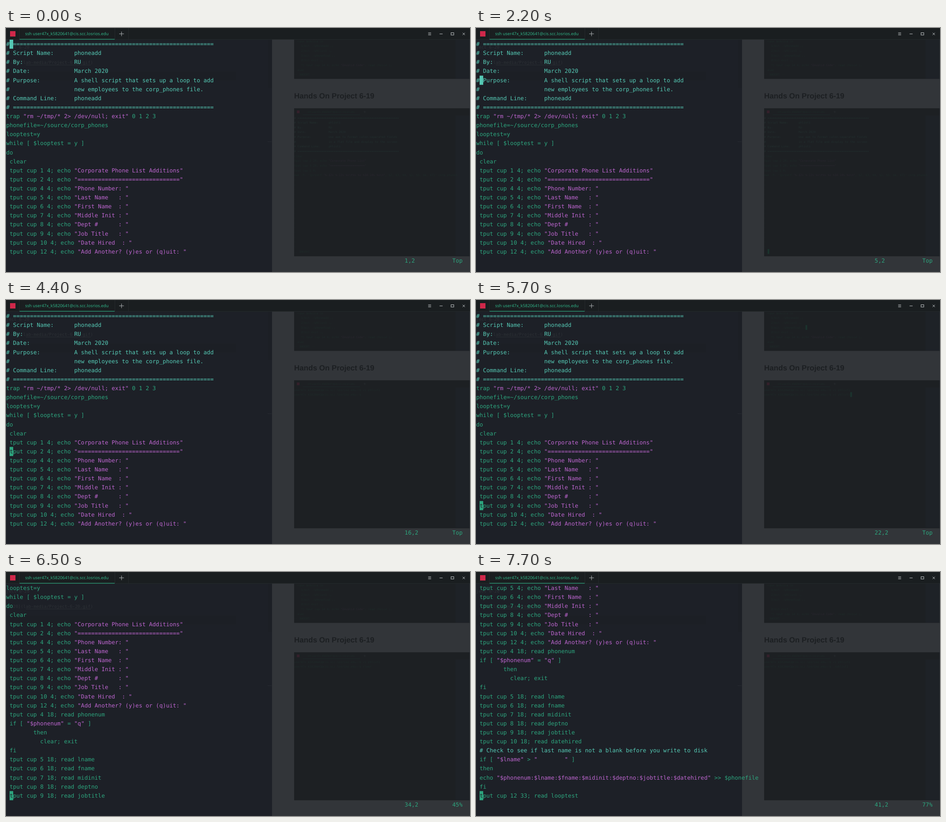
Recreate the animation shown at these times as an HTML page. Size 1029x544 px, loop 8000 ms.

```html
<!DOCTYPE html>
<html lang="en">
<head>
<meta charset="utf-8">
<title>Terminal</title>
<style>
  html, body { margin: 0; width: 100%; height: 100%; overflow: hidden; background: #1d2027; }
  svg { display: block; width: 1029px; height: 544px; }
  text { white-space: pre; text-rendering: geometricPrecision; }
  .term { font: 12.545px "DejaVu Sans Mono", monospace; fill: #2da57e; }
  .term .comment { fill: #55c8b4; }
  .term .string { fill: #bd65cf; }
  .small { font: 6.345px "DejaVu Sans Mono", monospace; fill: #1f2b2a; }
  .small .comment { fill: #232f2f; }
  .small .string { fill: #2a2730; }
  .page { font: 9.53px "DejaVu Sans Mono", monospace; fill: #2d3136; }
  .tab { font: 9.35px "Noto Sans", sans-serif; fill: #30b286; }
  .head { font: bold 16.68px "Liberation Sans", Arial, sans-serif; fill: #1c1f22; }
</style>
</head>
<body>
<svg id="stage" viewBox="0 0 1029 544">
  <rect width="1029" height="544" fill="#1d2027"/>
  <rect y="97" width="510" height="20" fill="#1c1f25"/>
  <rect x="581" y="26" width="9" height="108" fill="#1c1f25"/>
  <rect x="590" y="25" width="439" height="519" fill="#323539"/>
  <g fill="#1d2023">
    <rect x="639" y="25" width="390" height="88.5"/>
    <rect x="639" y="179" width="390" height="330"/>
  </g>
  <g fill="#1e2227">
    <rect x="997" y="25" width="31" height="88"/>
    <rect x="997" y="195" width="31" height="313"/>
  </g>
  <rect x="1028" y="25" width="1" height="519" fill="#2a2d31"/>

  <g class="page">
    <text x="52" y="46" text-anchor="end">ject 6-20</text>
    <text x="193" y="79.5" text-anchor="end">-20](lab-media/Project-6-20.gif)</text>
    <path d="M44 82.5H188" stroke="#292d32"/>
    <path d="M581 253.5h8" stroke="#3a3e43" stroke-dasharray="1 2"/>
  </g>
  <text class="head" x="639" y="157">Hands On Project 6-19</text>

  <rect x="645" y="184" width="6" height="6" fill="#33202a"/>
  <text x="721" y="188.5" text-anchor="middle" class="tab" style="font-size:5.3px;fill:#1f2b2a">ssh user47x_k5820641@cis.scc.losrios.edu</text>
  <path d="M658 193.5H785" stroke="#1f2b2a" stroke-width=".7"/>
  <path d="M793 187h5M795.5 184.5v5" stroke="#2a2e31" stroke-width=".6"/>
  <g id="menu" class="small"></g>
  <g id="shell" class="small"></g>
  <g id="editor" class="term"></g>

  <rect width="1029" height="25" fill="#1a1e20"/>
  <path d="M0 25.5H1029" stroke="#24292b"/>
  <path d="M29.5 0V25M241.5 0V25M271.5 0V25" stroke="#25292c"/>
  <path d="M30 25.2H241" stroke="#2da57e" stroke-width="1.3"/>
  <rect x="9" y="7" width="12" height="12" fill="#d0284a"/>
  <text class="tab" x="135" y="16" text-anchor="middle">ssh user47x_k5820641@cis.scc.losrios.edu</text>
  <g fill="none" stroke="#c5c9cb">
    <path d="M251 13H261.5M256.2 8V18.2" stroke-width=".9"/>
    <path d="M936.3 10.6h6.4M936.3 13.1h6.4M936.3 15.6h6.4" stroke-width=".9"/>
    <path d="M961.5 13.2h6.8"/>
    <rect x="987" y="10.5" width="6" height="5.2"/>
    <path d="M1012.7 10.7l5 5m0-5l-5 5"/>
  </g>
</svg>
<script>
const LOOP = 8000, ROWS = 24;
const COL = 7.553, ROW = 20.115, LEFT = 0.4, TOP = 25.8;
const SMALL_COL = 3.82, SMALL_ROW = 10.65, PANEL_X = 639;
const rule = "# " + "=".repeat(59);
const field = (name, value) => ("# " + name).padEnd(20) + value;
const ask = (row, label) => ` tput cup ${row} 4; echo "${label}"`;
const read = (row, name, col = 18) => ` tput cup ${row} ${col}; read ${name}`;

const script = [
  rule,
  field("Script Name:", "phoneadd"),
  field("By:", "RU"),
  field("Date:", "March 2020"),
  field("Purpose:", "A shell script that sets up a loop to add"),
  field("", "new employees to the corp_phones file."),
  field("Command Line:", "phoneadd"),
  rule,
  'trap "rm ~/tmp/* 2> /dev/null; exit" 0 1 2 3',
  "phonefile=~/source/corp_phones",
  "looptest=y",
  "while [ $looptest = y ]",
  "do",
  " clear",
  ask(1, "Corporate Phone List Additions"),
  ask(2, "=".repeat(30)),
  ask(4, "Phone Number: "),
  ask(5, "Last Name   : "),
  ask(6, "First Name  : "),
  ask(7, "Middle Init : "),
  ask(8, "Dept #      : "),
  ask(9, "Job Title   : "),
  ask(10, "Date Hired  : "),
  ask(12, "Add Another? (y)es or (q)uit: "),
  read(4, "phonenum"),
  ' if [ "$phonenum" = "q" ]',
  "        then",
  "          clear; exit",
  " fi",
  read(5, "lname"),
  read(6, "fname"),
  read(7, "midinit"),
  read(8, "deptno"),
  read(9, "jobtitle"),
  read(10, "datehired"),
  " # Check to see if last name is not a blank before you write to disk",
  ' if [ "$lname" > "        " ]',
  " then",
  ' echo "$phonenum:$lname:$fname:$midinit:$deptno:$jobtitle:$datehired" >> $phonefile',
  " fi",
  read(12, "looptest", 33),
];
const TOTAL = 46;

// [start time, line under the cursor]
const moves = [
  [0, 1], [1600, 2], [1900, 3], [2000, 4], [2200, 5], [2500, 6], [2700, 7],
  [2800, 8], [3100, 9], [3200, 10], [3400, 11], [3600, 12], [3800, 13],
  [4000, 14], [4300, 15], [4400, 16], [4700, 17], [5200, 18], [5600, 19],
  [5700, 22], [6300, 26], [6400, 30], [6500, 34], [6600, 36], [6700, 37],
  [7000, 38], [7600, 40], [7700, 41],
];

const listing = [
  rule,
  field("Script Name:", "phlist1"),
  field("By:", "RU"),
  field("Date:", "March 2020"),
  field("Purpose:", "Use awk to format colon-separated fields"),
  field("", "in a flat file and display to the screen"),
  field("Command Line:", "phlist1"),
  rule,
  "clear",
  'tput cup 2 20; echo "Corporate Phone List"',
  'tput cup 3 20; echo "===================="',
  "tput cup 5 0;",
  "awk -F: '{printf \"%-12s %-12s %s\\t%s %s %10.10s %s\\n\", $2, $3, $4, $1, $5, $6, $7}' corp_phones",
  ...Array(15).fill("~"),
];
const prompt = "user47x_k5820641@cis.scc.losrios.edu:~$ ";
const choices = [
  "  case $choice in",
  "    1|bit ./phoneadd ;;",
  "    2|bit ./phlist1 ;;",
  "    3|bit ./phonefind ;;",
];
const choicesEnd = [
  "    Q|bit exit ;;",
  '    *) tput cup 14 4; echo "Invalid Code"; read choice ;;',
  "  esac",
];

// Background panels: [start time, state]
const menuStates = [
  [0, {}], [3400, { at: [0, 17] }], [3800, { at: [2, 22] }], [4400, {}],
  [4900, { at: [2, 22] }], [5700, { at: [3, 24] }], [6300, {}], [7000, { opened: true }],
];
const shellStates = [
  [0, { vim: "-- INSERT --" }], [2000, { vim: " :", at: [28, 2] }],
  [3100, { cmd: "" }], [5200, { cmd: "vi phlist1", at: [1, 50] }],
  [6300, { cmd: "clear" }], [6700, { cmd: "clear", at: [1, 45] }],
  [7000, { cmd: "./phlist1" }],
];

const $ = id => document.getElementById(id);
const pick = (list, t) => list.filter(([start]) => start <= t).pop()[1];
const esc = s => s.replace(/&/g, "&amp;").replace(/</g, "&lt;").replace(/>/g, "&gt;");
const isComment = line => /^\s*#/.test(line);

function colour(line) {
  if (isComment(line)) return `<tspan class="comment">${esc(line)}</tspan>`;
  return esc(line).replace(/"[^"]*"/g, s => `<tspan class='string'>${s}</tspan>`);
}

function cell(row, col, markup) {
  return `<text x="${LEFT + col * COL}" y="${TOP + row * ROW + 14.35}">${markup}</text>`;
}

// The block takes the colour of the text it covers.
function cursorMarkup(row, line) {
  const kind = isComment(line) ? "comment" : "";
  return `<rect class="${kind}" x="8" y="${TOP + row * ROW}" width="${COL + 0.4}" height="${ROW + 0.3}"/>` +
    cell(row, 1, `<tspan fill="#1d2027">${esc(line[1])}</tspan>`);
}

function editorMarkup(line, lit) {
  const top = Math.max(1, line - ROWS + 1);
  let out = script.slice(top - 1, top - 1 + ROWS).map((s, i) => cell(i, 0, colour(s))).join("");
  if (lit) out += cursorMarkup(line - top, script[line - 1]);
  const percent = Math.floor((top - 1) * 100 / (TOTAL - ROWS));
  const place = top === 1 ? "Top" : String(percent).padStart(2) + "%";
  return out + cell(ROWS, 117, line + ",2") + cell(ROWS, 131, place);
}

function panelMarkup(lines, y, at) {
  const text = lines.map((s, i) =>
    `<text x="${PANEL_X}" y="${y + i * SMALL_ROW + 2.3}">${colour(s)}</text>`).join("");
  if (!at) return text;
  const [row, col] = at;
  return text + `<rect x="${PANEL_X + col * SMALL_COL}" y="${y + row * SMALL_ROW - 5.3}" ` +
    `width="${SMALL_COL}" height="${SMALL_ROW}" fill="#1b332d"/>`;
}

function menuMarkup({ at, opened }) {
  const gap = opened ? [""] : [];
  const end = opened ? choicesEnd.slice(0, 2) : choicesEnd;
  return panelMarkup([...choices, ...gap, ...end, "-- INSERT --"], 29.3, at);
}

function shellMarkup({ vim, cmd, at }) {
  const lines = vim ? [...listing, vim] : [prompt + "vi phlist1", prompt + cmd];
  return panelMarkup(lines, 200.2, at);
}

const drawn = {};
function put(id, markup) {
  if (drawn[id] === markup) return;
  $(id).innerHTML = drawn[id] = markup;
}

function draw(t) {
  const hidden = (t >= 500 && t < 1100) || (t >= 7200 && t < 7600);
  put("editor", editorMarkup(pick(moves, t), !hidden));
  put("menu", menuMarkup(pick(menuStates, t)));
  put("shell", shellMarkup(pick(shellStates, t)));
}

const began = performance.now();
function tick() {
  draw((performance.now() - began) % LOOP);
  requestAnimationFrame(tick);
}
tick();
</script>
</body>
</html>
```
